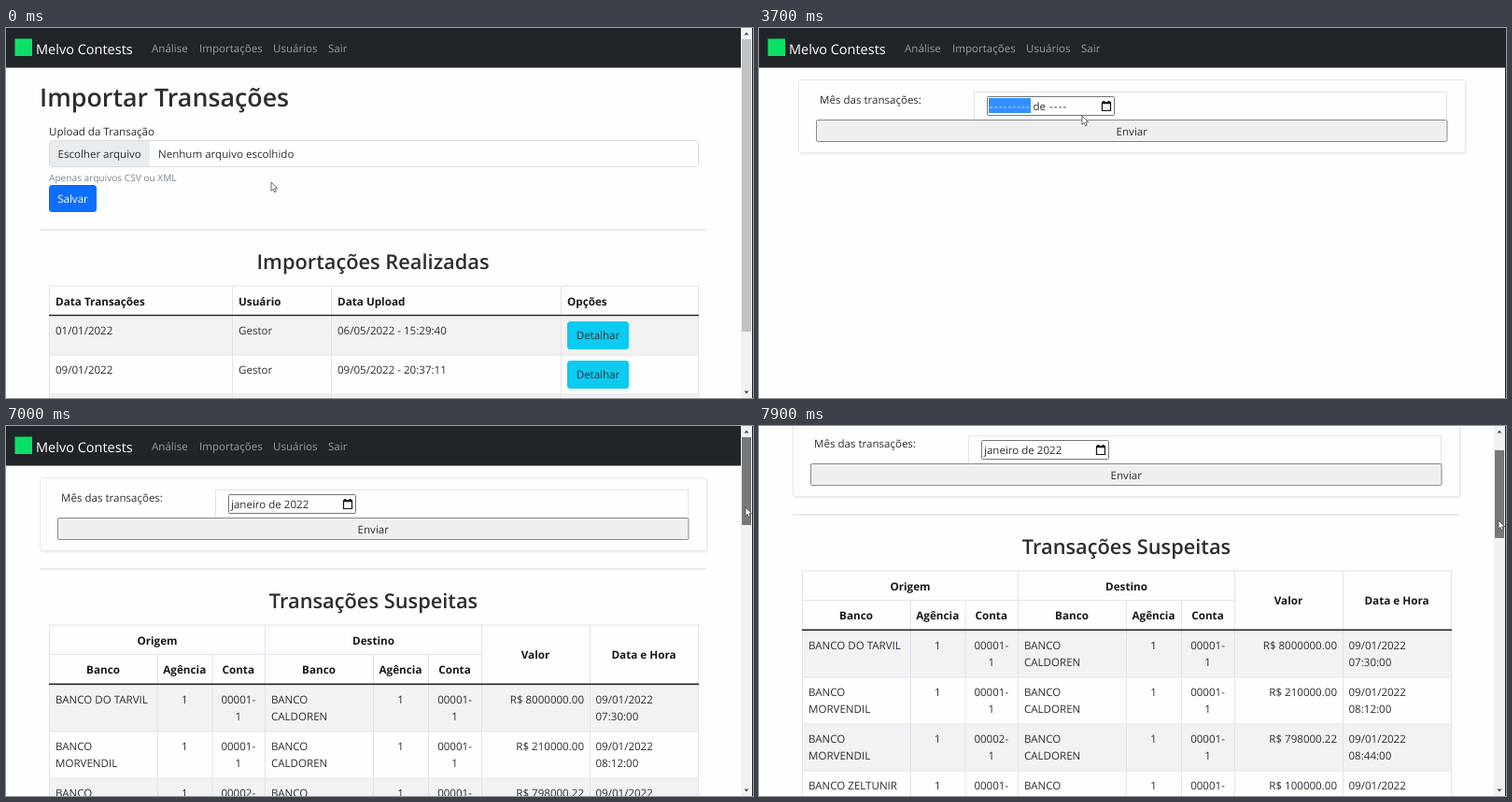
These frames come from a looping animation (800x396 px, 8 s). An HTML page:

```html
<!DOCTYPE html>
<html lang="pt-BR">
<head>
<meta charset="utf-8">
<title>Importar Transações</title>
<style>
  html, body { margin: 0; width: 100%; height: 100%; overflow: hidden; background: #fefefe; }
  svg { display: block; width: 800px; height: 396px; }
  text { font: 11.55px "Open Sans", "Noto Sans", sans-serif; fill: #2a2e32; text-rendering: geometricPrecision; white-space: pre; }
  text.bold { font-size: 11.7px; font-weight: 700; fill: #16191c; }
  text.h1 { font-size: 26.8px; font-weight: 600; }
  text.h2 { font-size: 21.8px; font-weight: 600; }
  text.small { font-size: 10.15px; fill: #7d858c; }
  text.brand { font-size: 14.5px; fill: #fff; }
  text.link { fill: #999b9d; }
  text.link.hover { fill: #c3c5c7; }
  text.light { fill: #fff; }
  text.dashes { letter-spacing: 1.15px; }
</style>
</head>
<body>
<svg id="stage" viewBox="0 0 800 396" xmlns="http://www.w3.org/2000/svg"></svg>
<script>
const LOOP = 8000, STEP = 100;
const INK = '#212529', PAPER = '#fefefe', LINE = '#e2e4ec', STRIPE = '#f2f2f2';
const BUTTON = '#efefef', BUTTON_EDGE = '#8a8a8a', THUMB = '#c1c1c1';
const stage = document.getElementById('stage');

function add(parent, tag, attrs = {}, content) {
  const node = document.createElementNS('http://www.w3.org/2000/svg', tag);
  for (const key in attrs) node.setAttribute(key, attrs[key]);
  if (content !== undefined) node.textContent = content;
  parent.appendChild(node);
  return node;
}
const group = parent => add(parent, 'g');
const rect = (p, x, y, width, height, fill, more) => add(p, 'rect', { x, y, width, height, fill, ...more });
const text = (p, x, y, content, cls = '', anchor = 'start') =>
  add(p, 'text', { x, y, class: cls, 'text-anchor': anchor }, content);
const centered = (p, x, y, content, cls) => text(p, x, y, content, cls, 'middle');
const path = (p, d, more) => add(p, 'path', { d, fill: 'none', ...more });
const vlines = (p, xs, top, bottom) =>
  path(p, xs.map(x => `M${x + .5} ${top}V${bottom}`).join(''), { stroke: LINE });
const show = (node, on) => node.setAttribute('display', on ? 'inline' : 'none');

function navbar(p, width) {
  rect(p, 0, 0, width, 42.5, INK);
  rect(p, 9.5, 11.5, 18.5, 18.5, '#0be066');
  text(p, 32, 27.5, 'Melvo Contests', 'brand');
  const links = [[156, 'Análise'], [207, 'Importações'], [286, 'Usuários'], [345, 'Sair']];
  return links.map(([x, label]) => text(p, x, 26, label, 'link'))[0];
}

function importPage() {
  const g = group(stage);
  const link = navbar(g, 787);
  text(g, 36, 84, 'Importar Transações', 'h1');
  text(g, 46, 115, 'Upload da Transação');
  rect(g, 46.5, 120.5, 695, 28, PAPER, { stroke: '#d8dce2', rx: 3 });
  rect(g, 47, 121, 107, 27, '#e9ecef');
  text(g, 55.5, 139, 'Escolher arquivo');
  text(g, 163, 139, 'Nenhum arquivo escolhido');
  text(g, 46, 164, 'Apenas arquivos CSV ou XML', 'small');
  rect(g, 46, 168, 51, 29, '#0d6efd', { rx: 3.5 });
  centered(g, 71.5, 187, 'Salvar', 'light');
  rect(g, 36, 215.5, 714, 1, '#d3d4d6');
  centered(g, 393, 258, 'Importações Realizadas', 'h2');

  const cols = [46, 242, 348, 594, 741];
  const rows = [['01/01/2022', '06/05/2022 - 15:29:40'], ['09/01/2022', '09/05/2022 - 20:37:11']];
  rect(g, 46, 308, 695, 42, STRIPE);
  rect(g, 46, 392, 695, 4, STRIPE);
  rect(g, 46, 275.5, 696, 1, LINE);
  vlines(g, cols, 276, 396);
  ['Data Transações', 'Usuário', 'Data Upload', 'Opções']
    .forEach((label, i) => text(g, cols[i] + 7, 297, label, 'bold'));
  rows.forEach(([date, upload], i) => {
    const y = 328 + i * 42;
    [date, 'Gestor', upload].forEach((value, c) => text(g, cols[c] + 7, y, value));
    rect(g, 601, y - 14, 66, 30, '#0dcaf0', { rx: 3.5 });
    centered(g, 634, y + 5, 'Detalhar');
    rect(g, 46, y + 21.5, 696, 1, LINE);
  });
  rect(g, 46, 306.8, 696, 1.4, INK);
  return { g, link };
}

// Search card shared by the empty form and the result page.
function searchForm(p) {
  rect(p, 43, 57, 715, 79, '#f3f3f5', { rx: 4 });
  rect(p, 42.5, 55.5, 714, 78, PAPER, { rx: 3, stroke: '#e6e6ee' });
  text(p, 65, 81, 'Mês das transações:');
  rect(p, 230.5, 68.5, 506, 30, 'none', { stroke: LINE });
  rect(p, 244.5, 73.5, 136, 20, PAPER, { stroke: '#767676', rx: 1 });
  const empty = group(p);
  const highlight = rect(empty, 246, 75, 45, 16, '#3390ff');
  const dashes = text(empty, 247, 88, '---------', 'dashes');
  text(empty, 293.5, 88, 'de');
  text(empty, 311, 88, '----', 'dashes');
  const filled = text(p, 247, 88, 'janeiro de 2022');
  path(p, 'M367.5 80V88.5H376.5V80Z', { stroke: '#111', 'stroke-width': 1.2 });
  path(p, 'M367 80.2H377M369.3 78V80M374.7 78V80', { stroke: '#111', 'stroke-width': 2 });
  const button = rect(p, 61.5, 98.5, 675.5, 23, BUTTON, { stroke: BUTTON_EDGE, rx: 1.5 });
  centered(p, 399.3, 115, 'Enviar');
  return { empty, filled, highlight, dashes, button };
}

function formPage() {
  const g = group(stage);
  const link = navbar(g, 799);
  return { g, link, ...searchForm(g) };
}

function resultPage() {
  const g = group(stage);
  navbar(g, 787);
  const card = group(g);
  card.setAttribute('transform', 'translate(-6 0)');
  show(searchForm(card).empty, false);
  rect(g, 36, 152.5, 714, 1, '#d8d8dc');
  centered(g, 393.5, 195, 'Transações Suspeitas', 'h2');

  const cols = [46, 162, 220.5, 277, 393, 452, 509, 625, 741];
  const mid = i => (cols[i] + cols[i + 1]) / 2;
  const rows = [
    [['BANCO DO TARVIL'], '00001-', '8000000.00', '07:30:00'],
    [['BANCO', 'MORVENDIL'], '00001-', '210000.00', '08:12:00'],
    [['BANCO', 'MORVENDIL'], '00002-', '798000.22', '08:44:00'],
    [['BANCO ZELTUNIR'], '00001-', '100000.00', '09:15:00']
  ];
  rows.forEach((row, i) => { if (i % 2 === 0) rect(g, 46, 277 + i * 50, 695, 50, STRIPE); });
  rect(g, 46, 212.5, 696, 1, LINE);
  rect(g, 46, 244, 463, 1, LINE);
  vlines(g, [46, 277, 509, 625, 741], 213, 480);
  vlines(g, [162, 220.5, 393, 452], 244, 480);
  const head = (x, y, label) => centered(g, x, y, label, 'bold');
  head(162, 234, 'Origem');
  head(393.5, 234, 'Destino');
  head(567, 249, 'Valor');
  head(683, 249, 'Data e Hora');
  ['Banco', 'Agência', 'Conta', 'Banco', 'Agência', 'Conta']
    .forEach((label, i) => head(mid(i), 265, label));

  rows.forEach(([bank, account, value, time], i) => {
    const y = 297 + i * 50;
    const lines = (x, list, anchor) => list.forEach((s, n) => text(g, x, y + n * 18, s, '', anchor));
    lines(53, bank);
    lines(mid(1), ['1'], 'middle');
    lines(mid(2), [account, '1'], 'middle');
    lines(284, ['BANCO', 'CALDOREN']);
    lines(mid(4), ['1'], 'middle');
    lines(mid(5), ['00001-', '1'], 'middle');
    lines(619, ['R$ ' + value], 'end');
    lines(631.5, ['09/01/2022', time]);
    rect(g, 46, y + 29.5, 696, 1, LINE);
  });
  rect(g, 46, 275.5, 696, 1.6, INK);
  return { g };
}

function scrollbar() {
  const g = group(stage);
  rect(g, 787, 0, 12, 396, '#f1f1f1');
  const thumb = rect(g, 788, 12, 10, 94, THUMB);
  path(g, 'M790.5 7.5L793 4.5L795.5 7.5ZM790.5 388.5L793 391.5L795.5 388.5Z', { fill: '#505050' });
  return { g, thumb };
}

rect(stage, 0, 0, 800, 396, PAPER);
const imports = importPage(), form = formPage(), result = resultPage(), bar = scrollbar();
rect(stage, 799, 0, 1, 396, INK);
const cursorLook = { fill: '#fff', stroke: '#444', 'stroke-width': .8 };
const arrow = path(stage, 'M0 0V9.3L2.1 7.4L3.6 10.8L5.2 10.1L3.7 6.8H6.6Z', cursorLook);
const hand = path(stage, 'M-1 1Q0 -.6 1 1V4.2L5 5.2Q6 5.6 5.8 7L4.8 11.3H-.4L-3.2 7.2Q-3.4 5.8-2 6.2L-1 7Z', cursorLook);

// Cursor stops: time, x, y.
const stops = [
  [0, 284, 165], [800, 171, 32], [1400, 171, 32], [2000, 300, 80], [2300, 300, 80],
  [2400, 371, 83], [2500, 371, 83], [2600, 366, 82], [2900, 366, 82], [3100, 346, 94],
  [4200, 346, 94], [4600, 398, 113], [6200, 398, 113], [6500, 792, 87], [LOOP, 792, 87]
];
function cursorAt(t) {
  const i = stops.findIndex(s => s[0] > t);
  const [t0, x0, y0] = stops[i - 1], [t1, x1, y1] = stops[i];
  const k = (t - t0) / (t1 - t0), e = k * k * (3 - 2 * k);
  return [x0 + (x1 - x0) * e, y0 + (y1 - y0) * e];
}

function draw(time) {
  const t = Math.floor(time % LOOP / STEP) * STEP;
  const onImports = t < 1100, onResult = t >= 5300, onForm = !onImports && !onResult;
  show(imports.g, onImports);
  show(form.g, onForm);
  show(result.g, onResult);
  show(bar.g, !onForm);

  const overLink = t >= 700 && t < 1500;
  for (const page of [imports, form]) page.link.classList.toggle('hover', overLink);

  const chosen = t >= 3800, focused = t >= 2400 && !chosen, overButton = t >= 4600;
  show(form.empty, !chosen);
  show(form.filled, chosen);
  show(form.highlight, focused);
  form.dashes.style.fill = focused ? '#d5e8ff' : '';
  form.button.setAttribute('fill', overButton ? '#e5e5e5' : BUTTON);
  form.button.setAttribute('stroke', overButton ? '#5f5f5f' : BUTTON_EDGE);

  // Dragging the thumb moves the page at a steady rate.
  const scroll = t < 7300 ? 0 : Math.floor((t - 7200) / STEP * 8.3);
  const drag = scroll * .24;
  result.g.setAttribute('transform', `translate(0 ${-scroll})`);
  bar.thumb.setAttribute('y', 12 + drag);
  bar.thumb.setAttribute('height', onImports ? 313 : 94);
  bar.thumb.setAttribute('fill', t >= 7000 ? '#787878' : t >= 6700 ? '#a8a8a8' : THUMB);

  const [x, y] = cursorAt(t);
  const pointing = overLink || (t >= 4500 && t <= 6200);
  show(hand, pointing);
  show(arrow, !pointing);
  (pointing ? hand : arrow).setAttribute('transform', `translate(${x} ${y + drag})`);
}

const start = performance.now();
(function tick() {
  draw(performance.now() - start);
  requestAnimationFrame(tick);
})();
</script>
</body>
</html>
```
